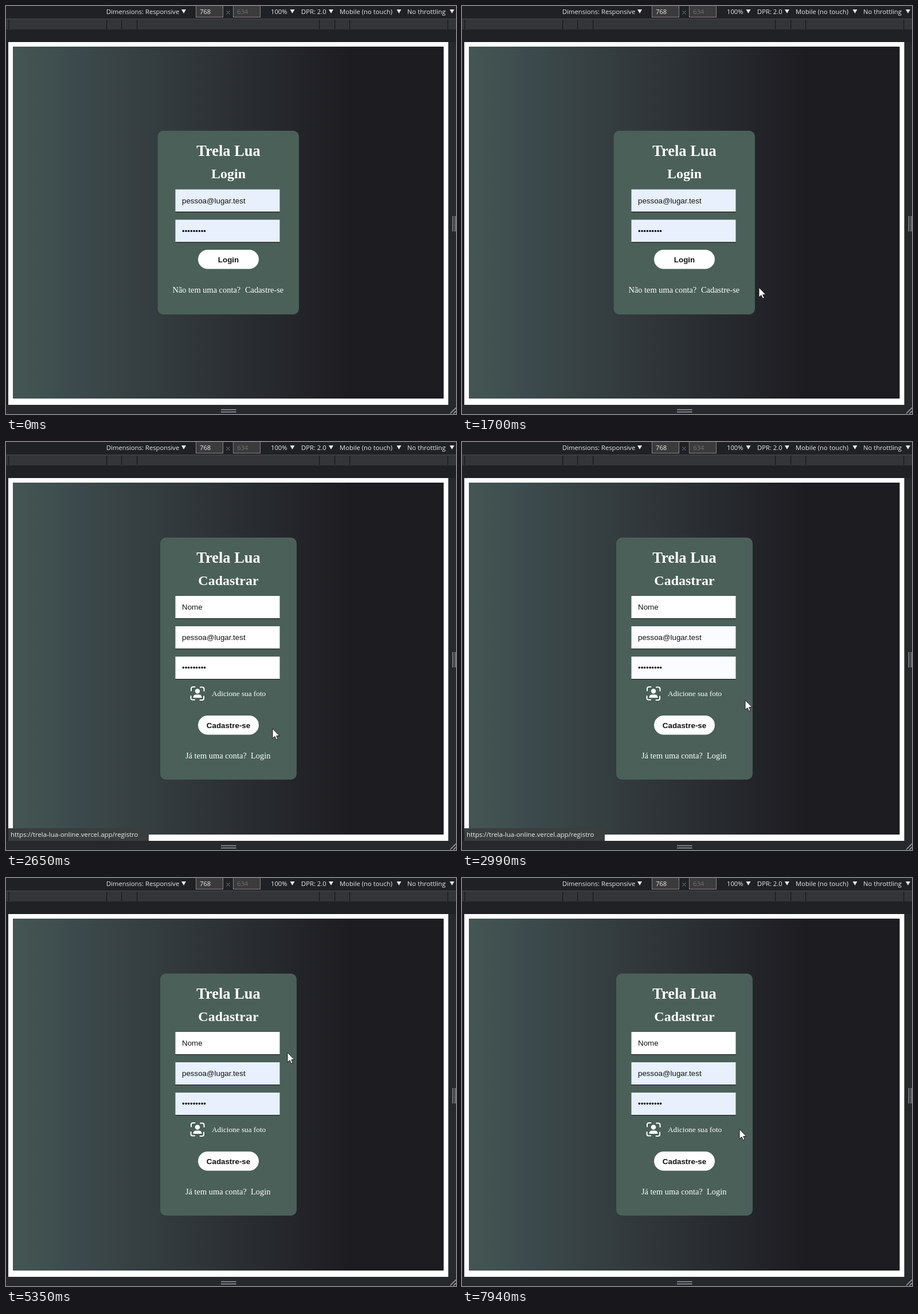
Write an HTML page that moves like this. It is 785 px wide and 713 px high and loops after 8 s.

```html
<!DOCTYPE html>
<html lang="pt">
<head>
<meta charset="utf-8">
<title>Login</title>
<style>
html, body { margin: 0; width: 100%; height: 100%; overflow: hidden; background: #202124; }
svg { display: block; width: 785px; height: 713px; }
text { white-space: pre; }
.ui { font: 11.25px "Open Sans", "Noto Sans", sans-serif; fill: #e8eaed; }
.sans { font: 13.33px "Liberation Sans", Arial, sans-serif; fill: #111; }
.serif { font: 14.4px "Liberation Serif", "Times New Roman", serif; fill: #fff; }
.bold { font-weight: bold; }
.mid { text-anchor: middle; }
</style>
</head>
<body>
<svg id="stage" viewBox="0 0 785 713" xmlns="http://www.w3.org/2000/svg"></svg>
<script>
const LOOP = 8000, SWITCH = 2590;
const EMAIL = 'pessoa@lugar.test', BRAND = 'Trela Lua', DOTS = '•'.repeat(9);

const rect = (x, y, w, h, fill, more = '') =>
  `<rect x="${x}" y="${y}" width="${w}" height="${h}" fill="${fill}" ${more}/>`;
const text = (x, y, s, cls, more = '') => `<text x="${x}" y="${y}" class="${cls}" ${more}>${s}</text>`;
const path = (d, more) => `<path d="${d}" ${more}/>`;
const size = px => `style="font-size:${px}px"`;

function toolbar() {
  const labels = [[175, 'Dimensions: Responsive'], [462, '100%'], [515, 'DPR: 2.0'],
    [582, 'Mobile (no touch)'], [700, 'No throttling']];
  const arrows = [310, 499.5, 567, 685.5, 778];
  const ticks = [4, 175, 201, 228, 546, 573, 599, 770];
  const box = x => rect(x + .5, -2.5, 47, 22, '#3b3b3b', 'stroke="#858585"');
  return rect(0, 0, 785, 713, '#202124')
    + rect(0, 22, 785, 1, '#48494c') + rect(0, 23, 785, 18, '#343538')
    + ticks.map(x => rect(x, 24, 1.3, 16, '#18191b')).join('')
    + labels.map(([x, s]) => text(x, 13.5, s, 'ui')).join('')
    + arrows.map(x => path(`M${x - 4} 6h8l-4 7z`, 'fill="#e8eaed"')).join('')
    + box(331) + box(396)
    + text(338, 13.5, '768', 'ui') + text(403, 13.5, '634', 'ui', 'style="fill:#6f7072"')
    + path('M384.5 8.5l6 6m0-6l-6 6', 'stroke="#6d8ca8"');
}

function viewport() {
  return rect(771, 63, 14, 650, '#27282c') + rect(0, 697, 785, 16, '#27282c')
    + rect(4, 63, 767.5, 634, '#fff') + rect(12, 71, 751.5, 615, 'url(#shade)')
    + path('M779.5 367v27M783.5 367v27', 'stroke="#8c9196" stroke-width="1.6"')
    + path('M375 705.5h26.5M375 709.5h26.5', 'stroke="#9aa0a6" stroke-width="1.6"')
    + path('M775 712l10-10M780.5 712.5l5-5', 'stroke="#9aa0a6" stroke-width="1.6"');
}

const card = (x, y, w, h) => rect(x, y, w, h, '#4a6058', 'rx="10"');
const heading = (top, sub) =>
  text(388, top, BRAND, 'serif bold mid', size(26.5)) +
  text(388, top + 39.5, sub, 'serif bold mid', size(24));
const field = (y, s, fill, cls = '') =>
  rect(295.5, y, 182, 39, fill, `class="${cls}"`) + rect(295.5, y + 39, 182, 1, '#111') +
  text(307, y + 24, s, 'sans');
const button = (y, s) =>
  rect(335, y, 106, 33.5, '#fff', 'rx="16.75"') + text(388, y + 21.5, s, 'sans bold mid');

function photoIcon() {
  const corner = a => path('M323 434.5v-3.5q0-3 3-3h3.5', `transform="rotate(${a} 334 439.5)"`);
  return `<g fill="none" stroke="#fff" stroke-width="2" stroke-linecap="round">${[0, 90, 180, 270].map(corner).join('')}</g>`
    + '<circle cx="334" cy="435.5" r="4.2" fill="#fff"/>'
    + path('M326.5 447q0-5.5 5-5.5h5q5 0 5 5.5z', 'fill="#fff"');
}

const loginPage = () => card(264.5, 218, 246.5, 321) + heading(261.5, 'Login')
  + field(320.5, EMAIL, '#e8f0fe') + field(373.5, DOTS, '#e8f0fe') + button(426, 'Login')
  + text(290.5, 500.5, 'Não tem uma conta?', 'serif') + text(417, 500.5, 'Cadastre-se', 'serif');

const signupPage = () => card(269, 167, 238, 423) + heading(210.5, 'Cadastrar')
  + field(269, 'Nome', '#fff') + field(322, EMAIL, '#fff', 'auto') + field(375, DOTS, '#fff', 'auto')
  + photoIcon() + text(359, 444, 'Adicione sua foto', 'serif', size(13.25)) + button(478, 'Cadastre-se')
  + text(313, 552.5, 'Já tem uma conta?', 'serif') + text(427, 552.5, 'Login', 'serif');

const outline = 'fill="#fff" stroke="#1b1b1f" stroke-width="1" stroke-linejoin="round"';
const cursors = () =>
  path('M0 0V17L4 13.4 6.6 19.3 9.2 18.2 6.7 12.5H12Z', `id="arrow" ${outline}`)
  + path('M-2 1.5Q-2-.5-.2-.5 1.5-.5 1.5 1.5V7Q3.2 5.8 4.7 7.4 6.3 6.6 7.3 8.3 10 8 10 10.5V15Q10 18 8 20.5V23H-1V20.5Q-4 17-6.4 13-7.4 11-6 10.2-4.6 9.6-3.2 11.6L-2 13Z', `id="hand" ${outline}`)
  + path('M-3-6q2.500 3 1 0-1 3-1M0-5V5M-3 6q2.500 3-1 0 1 3 1', 'id="beam" fill="none" stroke="#222"');

const stage = document.getElementById('stage');
stage.innerHTML = `<defs><linearGradient id="shade">
  <stop offset="0" stop-color="#445653"/><stop offset=".1" stop-color="#3f4e4f"/>
  <stop offset=".14" stop-color="#3c4a4e"/><stop offset=".2" stop-color="#3a4647"/>
  <stop offset=".45" stop-color="#2e3438"/><stop offset=".78" stop-color="#1d1c21"/>
  </linearGradient></defs>`
  + toolbar() + viewport()
  + `<g id="login">${loginPage()}</g><g id="signup">${signupPage()}</g>`
  + `<g id="status">${path('M4 675h242q3 0 3 3v19H4z', 'id="statusBg"')}${text(8, 690, 'https://trela-lua-online.vercel.app/registro', 'ui', 'id="statusText" style="font-size:11.43px"')}</g>`
  + '<circle id="ring" r="12" fill="#fff" fill-opacity=".15"/>'
  + `<g id="cursor">${cursors()}</g>`;

const $ = id => document.getElementById(id);
const show = (id, on) => $(id).setAttribute('display', on ? 'inline' : 'none');
const clamp = v => Math.max(0, Math.min(1, v));
const mix = (a, b, k) => a + (b - a) * k;
const blend = (a, b, k) => `rgb(${a.map((v, i) => Math.round(mix(v, b[i], k)))})`;

// time, x, y of the pointer tip
const track = [
  [310, 741, 688], [620, 706, 540], [860, 650, 437], [1070, 600, 449],
  [1400, 557, 476], [1700, 518, 492], [1910, 489, 493], [2180, 464, 502.5],
  [2640, 464, 502.5], [2990, 494.5, 451], [3130, 487, 392], [3480, 482, 325],
  [3800, 457.5, 287], [3930, 457.5, 287], [4550, 488, 297], [4680, 488, 297],
  [4750, 487, 297], [5140, 487, 297], [5600, 495, 314], [5960, 491, 330],
  [6170, 491, 330], [6510, 490, 360], [6990, 489, 389], [7200, 489, 389],
  [7870, 484, 439]
];
const clicks = [[2520, 2590], [4950, 5010], [5960, 6090], [7120, 7270]];

function pointer(t) {
  const i = track.findIndex(p => p[0] > t);
  if (i < 0) return track[track.length - 1].slice(1);
  if (i === 0) return track[0].slice(1);
  const a = track[i - 1], b = track[i], k = (t - a[0]) / (b[0] - a[0]);
  return [mix(a[1], b[1], k), mix(a[2], b[2], k)];
}

function cursorKind(x, y, signup) {
  const inside = (l, t, r, b) => x > l && x < r && y > t && y < b;
  if (!signup && inside(417, 488, 485, 505)) return 'hand';
  if (signup && [269, 322, 375].some(top => inside(295, top, 477, top + 40))) return 'beam';
  return 'arrow';
}

function render(t) {
  const signup = t >= SWITCH;
  show('login', !signup);
  show('signup', signup);

  const tint = blend([255, 255, 255], [232, 240, 254], clamp((t - 2960) / 170));
  document.querySelectorAll('.auto').forEach(el => el.setAttribute('fill', tint));

  const lit = clamp((t - 2380) / 280);
  show('status', t >= 2380 && t < 3130);
  $('statusBg').setAttribute('fill', blend([24, 25, 26], [58, 62, 62], lit));
  $('statusText').style.fill = blend([184, 186, 188], [240, 241, 242], lit);

  const [x, y] = pointer(t), kind = cursorKind(x, y, signup);
  const place = `translate(${Math.round(x)} ${Math.round(y)})`;
  show('cursor', t >= 310);
  $('cursor').setAttribute('transform', place);
  ['arrow', 'hand', 'beam'].forEach(id => show(id, id === kind));
  show('ring', clicks.some(([from, to]) => t >= from && t < to));
  $('ring').setAttribute('transform', place);
}

const start = performance.now();
function tick() {
  render((performance.now() - start) % LOOP);
  requestAnimationFrame(tick);
}
render(0);
requestAnimationFrame(tick);
</script>
</body>
</html>
```
